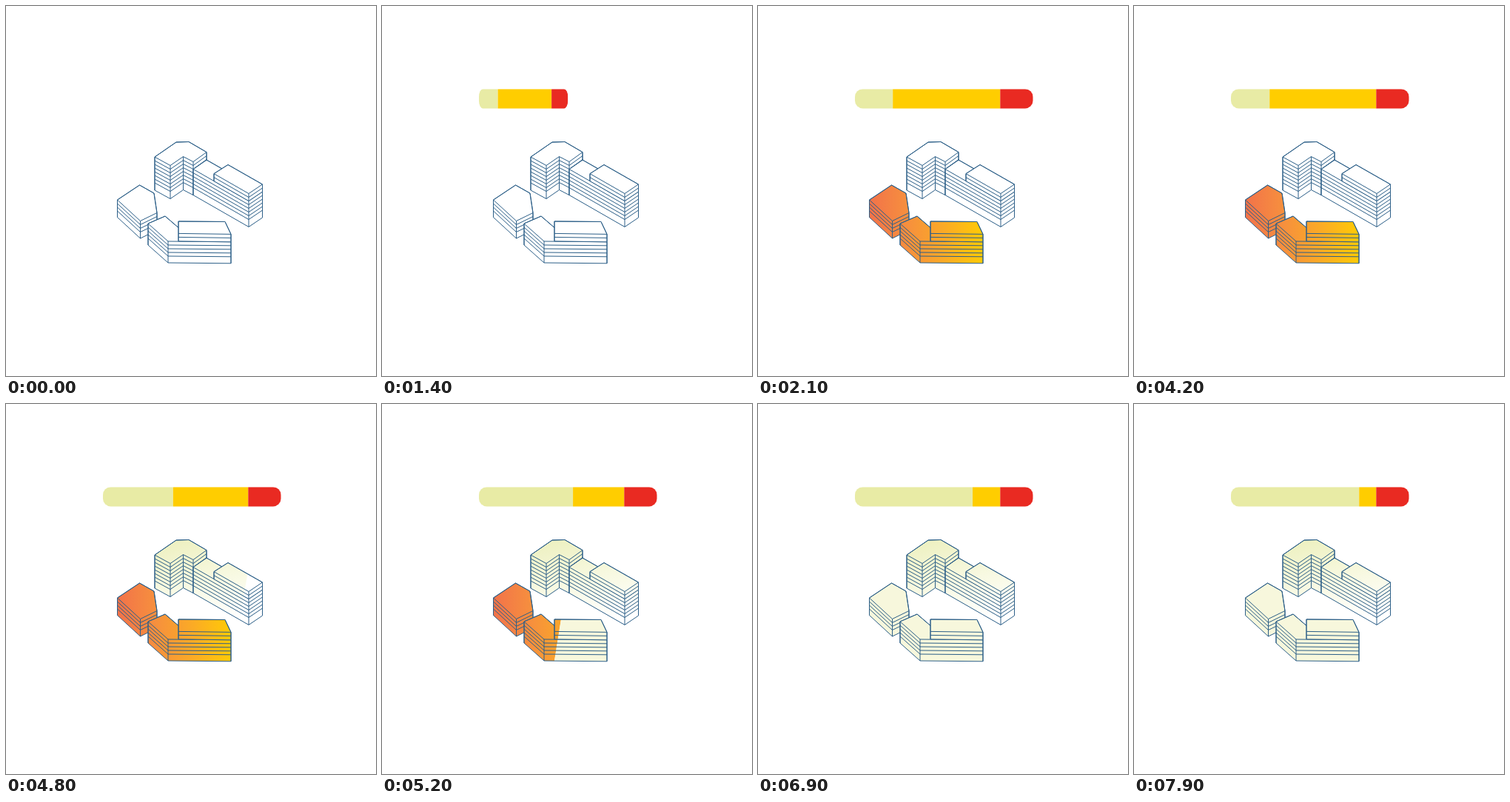
Write an HTML page with a canvas that moves like this. It is 500 by 500 pixels and loops after 8 s.

```html
<!DOCTYPE html>
<html lang="en">
<head>
<meta charset="utf-8">
<title>Buildings</title>
<style>
html, body { margin: 0; width: 100%; height: 100%; overflow: hidden; background: #fff; }
canvas { display: block; width: 500px; height: 500px; }
</style>
</head>
<body>
<canvas id="stage"></canvas>
<script>
const LOOP = 8000, STEP = 100, GAP = 5;
const canvas = document.getElementById('stage');
const ratio = window.devicePixelRatio || 1;
canvas.width = canvas.height = 500 * ratio;
const c = canvas.getContext('2d');
c.scale(ratio, ratio);

// A block is a roof whose first points run along the visible walls,
// with a number of equal floors above a taller base.
function block(walls, floors, base, ...roof) {
  const height = floors * GAP + base;
  const front = roof.slice(0, walls + 1);
  const shape = [...front.map(([x, y]) => [x, y + height]), ...roof.slice(walls), roof[0]];
  return { front, floors, height, shape, roof };
}

const REAR = [
  block(4, 7, 10, [201, 204], [222, 215.5], [239.5, 203.5], [253, 210.5],
    [271, 197.5], [247, 183.5], [230, 184]),
  block(2, 5, 10, [253, 220.5], [328, 263.5], [346.5, 251], [271, 208]),
  block(2, 1, 5, [281, 226.6], [328, 253.5], [346.5, 241], [300, 214.5])
];
const NEAR = [
  block(2, 3, 8.5, [150.5, 262], [181.5, 290.5], [204, 279.5], [200, 253], [180.5, 242]),
  block(2, 4, 9, [192, 294], [219, 318], [304, 318.8], [233, 299.5], [215, 284]),
  block(1, 1, 5.4, [233, 307.4], [304, 308.4], [296, 291.5], [233, 291])
];

function gradient(x0, y0, x1, y1, ...colors) {
  const g = c.createLinearGradient(x0, y0, x1, y1);
  colors.forEach((col, i) => g.addColorStop(i / (colors.length - 1), col));
  return g;
}
const WARM = gradient(150, 0, 304, 0, '#f2724a', '#f68f3e', '#fbab25', '#ffca06');
const MIST = gradient(250, 184, 275, 298, '#eef1c3', '#f8f9e2', '#ffffff');
const PALE = '#f7f7dc';

function smooth(t, a, b) {
  const p = Math.max(0, Math.min(1, (t - a) / (b - a)));
  return p * p * (3 - 2 * p);
}

function path(points, close) {
  c.beginPath();
  points.forEach(([x, y]) => c.lineTo(x, y));
  if (close) c.closePath();
}

function fill(points, style) {
  path(points, true);
  c.fillStyle = style;
  c.fill();
}

function stroke(points, close) {
  path(points, close);
  c.stroke();
}

// Fills the part of a shape between two slanted edges.
function sweep(shape, style, from, to) {
  if (to <= from) return;
  const at = (x, y) => [x + (319 - y) * 0.16, y];
  c.save();
  path([at(from, 0), at(to, 0), at(to, 500), at(from, 500)], true);
  c.clip();
  fill(shape, style);
  c.restore();
}

function drawBlock(b, paint) {
  fill(b.shape, '#fff');
  paint(b.shape);
  stroke(b.shape, true);
  stroke(b.roof, true);
  for (let i = 1; i <= b.floors; i++) stroke(b.front.map(([x, y]) => [x, y + i * GAP]));
  b.front.forEach(([x, y]) => stroke([[x, y], [x, y + b.height]]));
}

function drawBar(t) {
  const grow = smooth(t, 900, 1900);
  if (t < 1000) return;
  const split = 51.2 + 69.5 * smooth(t, 4100, 5490) + 0.0142 * Math.max(0, t - 4200);
  c.save();
  c.translate(131, 112.2);
  c.scale(grow, 1);
  c.beginPath();
  c.roundRect(0, 0, 240.5, 26.2, 10.5);
  c.clip();
  const part = (from, to, col) => { c.fillStyle = col; c.fillRect(from, 0, to - from, 27); };
  part(0, split, '#e8eba5');
  part(split, 196.3, '#ffcd00');
  part(196.3, 241, '#e92a22');
  c.restore();
}

function draw(t) {
  c.fillStyle = '#fff';
  c.fillRect(0, 0, 500, 500);
  c.strokeStyle = '#2c5f88';
  c.lineWidth = 1;
  c.lineJoin = 'round';
  drawBar(t);

  const mist = 180 + (t - 4200) * 0.22;
  const warm = 130 + (t - 1400) * 0.27;
  const pale = 237.5 - (t - 5200) * 0.2;
  REAR.forEach(b => drawBlock(b, shape => sweep(shape, MIST, 0, mist)));
  NEAR.forEach(b => drawBlock(b, shape => {
    sweep(shape, WARM, 0, Math.min(warm, pale));
    sweep(shape, PALE, pale, 500);
  }));
}

let start = null;
function tick(now) {
  if (start === null) start = now;
  const t = (now - start) % LOOP;
  draw(Math.floor(t / STEP) * STEP);
  requestAnimationFrame(tick);
}
draw(0);
requestAnimationFrame(tick);
</script>
</body>
</html>
```
